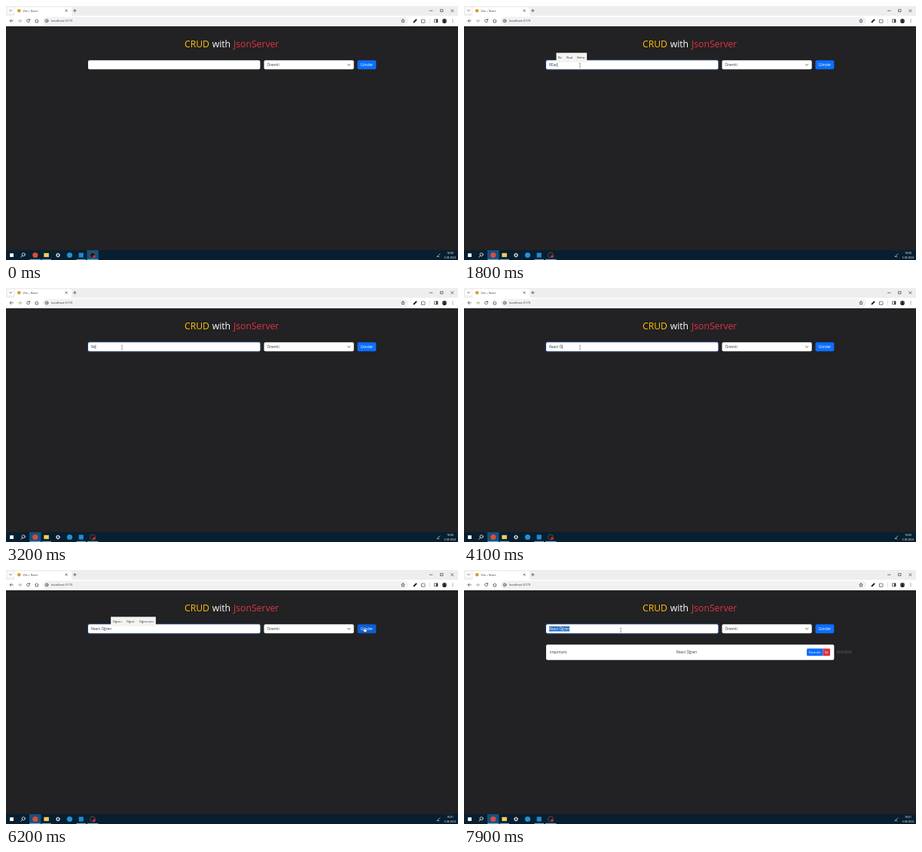
An HTML page that plays this animation: 600x338 px, repeating every 8 s.

```html
<!DOCTYPE html>
<html lang="tr">
<head>
<meta charset="utf-8">
<title>CRUD with JsonServer</title>
<style>
  html, body { margin: 0; width: 100%; height: 100%; overflow: hidden; background: #222123; }
  svg { display: block; width: 100vw; height: 100vh; }
  text { font: 4.75px "Open Sans", "Noto Sans", sans-serif; fill: #33373b; white-space: pre; }
  .h1 { font-size: 12.2px; font-weight: 500; }
  .small { font-size: 4.2px; }
  .tiny { font-size: 3.6px; }
  .mid { text-anchor: middle; }
  .light { fill: #fff; }
  .line { fill: none; stroke: #45484c; stroke-width: .75; stroke-linecap: round; stroke-linejoin: round; }
  .field { fill: #fff; }
</style>
</head>
<body>
<svg viewBox="0 0 600 338" preserveAspectRatio="none">
  <rect width="600" height="338" fill="#222123"/>

  <!-- tab strip -->
  <rect width="600" height="13" fill="#eeeeef"/>
  <rect x="1.5" y="1.5" width="9" height="9" rx="2.5" fill="#fbfbfb"/>
  <path class="line" d="M4.8 5.6l1.3 1.3 1.3-1.3"/>
  <path d="M9 13.2q2.5 0 2.5-2.5V4q0-2.5 2.5-2.5h70.5q2.5 0 2.5 2.5v6.700q0 2.500 2.500 2.500z" fill="#fff"/>
  <circle cx="17.300" cy="6.300" r="2.300" fill="#d99a35"/>
  <text x="22.500" y="7.800" class="tiny">Vite + React</text>
  <path class="line" d="M79 5.100l2.200 2.200m0-2.200l-2.200 2.200M89.500 6.200h3.600M91.300 4.400v3.600"/>
  <path class="line" stroke-width=".6" d="M562.500 6.300h3.500M577 4.700h3v3h-3zM590.800 4.700l3.200 3.200m0-3.200l-3.200 3.200"/>

  <!-- toolbar -->
  <rect y="13" width="600" height="14" fill="#fff"/>
  <rect x="49" y="14.500" width="485" height="10.600" rx="5.300" fill="#f0f1f3"/>
  <g class="line">
    <path d="M9.300 19.800H5.200m1.900-1.900l-1.900 1.900 1.900 1.900"/>
    <path d="M16.200 19.800h4.100m-1.900-1.900l1.900 1.900-1.900 1.900" stroke="#999"/>
    <path d="M31.300 18.600a2 2 0 1 0 .2 1.700M31.600 17.400v1.500h-1.500"/>
    <path d="M38.600 19.600l2.200-2 2.200 2M39.300 19.300v2.700h3v-2.700"/>
    <circle cx="54" cy="19.800" r="2"/>
    <path d="M54 19.700v1M54 18.700v.1"/>
    <path d="M527 17.600l.7 1.500 1.600.2-1.200 1.100.3 1.600-1.400-.8-1.400.8.300-1.600-1.200-1.100 1.600-.2z"/>
    <path d="M541.500 21.300l3-3" stroke="#111" stroke-width="1.900"/>
    <path d="M551.800 18.300h1.300q.7-1.500 1.400 0h1.300v1.300q1.500.7 0 1.400v1.200h-4z"/>
    <path d="M562.500 17v6" stroke="#d5d7da"/>
    <path d="M569 17.800h4v4h-4z"/>
  </g>
  <rect x="571" y="17.800" width="2" height="4" fill="#333"/>
  <text x="60" y="21.400" class="small" fill="#555">localhost:5173</text>
  <circle cx="582" cy="19.800" r="3.100" fill="#6d6258"/>
  <path d="M579.600 21.800q.3-1.500 1.500-1.600a1.500 1.500 0 1 1 1.800 0q1.200.1 1.500 1.600a3.100 3.100 0 0 1-4.800 0z" fill="#231f1e"/>
  <path d="M593 17.900v0m0 1.900v0m0 1.900v0" class="line" style="stroke-width:1"/>

  <!-- form -->
  <text x="237" y="55" class="h1" style="fill:#ffc107">CRUD</text>
  <text x="273.700" y="55" class="h1 light">with</text>
  <text x="302" y="55" class="h1" style="fill:#dc3545">JsonServer</text>
  <rect id="ring" x="108.300" y="71.600" width="229.700" height="13.200" rx="2.500" fill="none" stroke="#1b3a68" stroke-width="1.300"/>
  <rect class="field" x="109" y="72.200" width="228.400" height="12" rx="1.900"/>
  <rect id="mark" x="113" y="75" width="28" height="6.600" fill="#2a6cc4"/>
  <text id="entry" x="113" y="80"></text>
  <path id="caret" d="M0 75.500v5.600" stroke="#222" stroke-width=".5"/>
  <rect class="field" x="342.500" y="72.200" width="119.200" height="12" rx="1.900"/>
  <text x="346.500" y="80">Önemli</text>
  <path class="line" d="M453.500 77.500l1.700 1.700 1.700-1.700" style="stroke:#343a40"/>
  <rect id="send" x="466.500" y="72.200" width="24.800" height="12" rx="1.900"/>
  <text x="478.900" y="80" class="mid light">Gönder</text>
  <g id="hints">
    <rect y="62.300" height="12.600" fill="#f5f3f2"/>
    <text y="70.200" class="small"></text><text y="70.200" class="small"></text><text y="70.200" class="small"></text>
  </g>

  <!-- saved item -->
  <g id="item">
    <rect class="field" x="109" y="99.300" width="382.300" height="20.400" rx="1.900"/>
    <text x="114" y="111.200">important</text>
    <text x="282" y="111.200">React Öğren</text>
    <path d="M456.300 104.600H476.500v9.700H456.300q-1.300 0-1.300-1.300v-7.100q0-1.300 1.300-1.300z" fill="#0d6efd"/>
    <path d="M476.500 104.600h8.200q1.300 0 1.300 1.300v7.100q0 1.300-1.300 1.300h-8.200z" fill="#dc3545"/>
    <text x="465.700" y="110.900" class="mid light small">Düzenle</text>
    <text x="481.200" y="110.900" class="mid light small">Sil</text>
    <text x="495" y="111.200" style="fill:#68676a">6/4/2024</text>
  </g>

  <!-- taskbar -->
  <rect y="325" width="600" height="13" fill="#071f30"/>
  <rect id="active" y="325" width="15.400" height="13" fill="#14517f"/>
  <path d="M31.500 337.400h14.500M47.500 337.400h12.500M93.500 337.400h12.500M108 337.400h14.500" stroke="#76b9ed" stroke-width="1"/>
  <rect x="5.200" y="329.200" width="4.800" height="4.800" fill="#fff"/>
  <g class="line" style="stroke:#fff">
    <circle cx="23.200" cy="330.800" r="2.100"/>
    <path d="M21.600 332.400l-1.900 2"/>
    <circle cx="69" cy="331.600" r="1.900" stroke-width="1.100"/>
    <circle cx="69" cy="331.600" r="2.700" stroke-width=".8" stroke-dasharray=".7 1.420" stroke-linecap="butt"/>
    <path d="M572.300 333.500l3.600-3.600M572.300 333.500q1.500-.5 2.700.3" stroke="#cfd6dc"/>
  </g>
  <circle cx="38.800" cy="331.500" r="3.600" fill="#db4b3c"/>
  <rect x="50.300" y="328.800" width="6.600" height="5.300" fill="#f5cb58"/>
  <circle cx="84.500" cy="331.500" r="3.600" fill="#2491d0"/>
  <rect x="96.600" y="328.400" width="6.200" height="6.200" fill="#2489ca"/>
  <circle cx="115" cy="331.500" r="3.600" fill="#25191c" stroke="#8d8d90" stroke-width=".4"/>
  <circle cx="117" cy="333.200" r="1.700" fill="#e02b35"/>
  <text id="clock" x="589.500" y="330.300" class="mid light tiny"></text>
  <text x="589.500" y="336" class="mid light tiny" style="font-size:3.400px">6.04.2024</text>

  <!-- pointer shapes -->
  <g id="beam" fill="none" stroke="#55585c" stroke-width=".5"><path d="M-.9-2.600h1.800M-.9 2.600h1.800M0-2.600v5.200"/></g>
  <path id="arrow" d="M0 0v5.200l1.200-1.100.8 1.900.8-.3-.8-1.900h1.700z" fill="#fff" stroke="#222" stroke-width=".3"/>
  <path id="hand" d="M-.5-2.300q.6-.6 1 0v2l2 .5q.7.300.5 1.100l-.6 2.200h-2.900l-1.700-2.300q.1-.9.900-.5l.8.700z" fill="#fff" stroke="#222" stroke-width=".35"/>
</svg>
<script>
const LOOP = 8000, STEP = 100;
const el = id => document.getElementById(id);
const show = (id, on) => el(id).style.display = on ? '' : 'none';

// [ms, text in the field]
const typed = [
  [0, ''], [1300, 'R'], [1500, 'RE'], [1600, 'REa'], [1800, 'REac'], [2000, 'REact'],
  [2700, 'REac'], [2800, 'REa'], [2900, 'RE'], [3000, 'R'], [3100, 'Re'],
  [3300, 'Rea'], [3500, 'Reac'], [3700, 'React'], [3900, 'React '], [4000, 'React Ö'],
  [4200, 'React Öğ'], [4400, 'React Öğr'], [4600, 'React Öğre'], [4700, 'React Öğren']
];
// [ms, suggestions]
const hints = [
  [0, ''], [1500, 'Re Real Reha'], [2700, ''], [3300, 'Real React Reaksiyon'],
  [3900, ''], [4200, 'Öğle Öğren Öğrenci'], [4600, 'Öğren Öğret Öğrencim'], [6400, '']
];
// [ms, x, y]
const path = [
  [100, 118, 334], [800, 154, 79], [5100, 154, 79], [5800, 476, 79],
  [6500, 476, 79], [7000, 207.5, 77], [7300, 208.2, 80]
];

const at = (list, t) => list.filter(s => s[0] <= t).pop() || list[0];
const ease = p => p * p * (3 - 2 * p);
const inside = (x, y, left, right) => x > left && x < right && y > 72 && y < 85;

function pointer(t) {
  const a = at(path, t), b = path[path.indexOf(a) + 1] || a;
  const p = a === b ? 0 : ease(Math.max(0, (t - a[0]) / (b[0] - a[0])));
  return [a[1] + (b[1] - a[1]) * p, a[2] + (b[2] - a[2]) * p];
}

function drawHints(words, left) {
  show('hints', words);
  if (!words) return;
  const [box, ...labels] = el('hints').children;
  let x = left + 2.5;
  words.split(' ').forEach((word, i) => {
    labels[i].textContent = word;
    labels[i].setAttribute('x', x);
    x += labels[i].getComputedTextLength() + 6;
  });
  box.setAttribute('x', left);
  box.setAttribute('width', x - 3 - left);
}

function draw(t) {
  const [keyTime, text] = at(typed, t);
  const entry = el('entry');
  entry.textContent = text;
  const width = text ? entry.getComputedTextLength() : 0;
  const selected = t >= 7500;
  const focus = t >= 900 && t < 6400 || t >= 7300;
  const blink = Math.floor((t - Math.max(keyTime, 900)) / 500) % 2 === 0;

  show('ring', focus);
  show('mark', selected);
  el('mark').setAttribute('width', width);
  entry.style.fill = selected ? '#fff' : '';
  show('caret', focus && !selected && blink);
  el('caret').setAttribute('transform', `translate(${113.3 + width} 0)`);
  drawHints(at(hints, t)[1], 112 + width);

  show('item', t >= 6500);
  el('clock').textContent = t < 5500 ? '18:00' : '18:01';
  el('active').setAttribute('x', t < 900 ? 107.4 : 31);

  const [x, y] = pointer(t);
  const onSend = inside(x, y, 466, 492);
  const kind = onSend ? 'hand' : inside(x, y, 109, 338) ? 'beam' : 'arrow';
  el('send').setAttribute('fill', onSend ? '#0b5ed7' : '#0d6efd');
  for (const id of ['beam', 'arrow', 'hand']) {
    show(id, id === kind && t >= STEP);
    el(id).setAttribute('transform', `translate(${x} ${y})`);
  }
}

const start = performance.now();
function tick() {
  const t = (performance.now() - start) % LOOP;
  draw(Math.floor(t / STEP) * STEP);
  requestAnimationFrame(tick);
}
tick();
</script>
</body>
</html>
```
